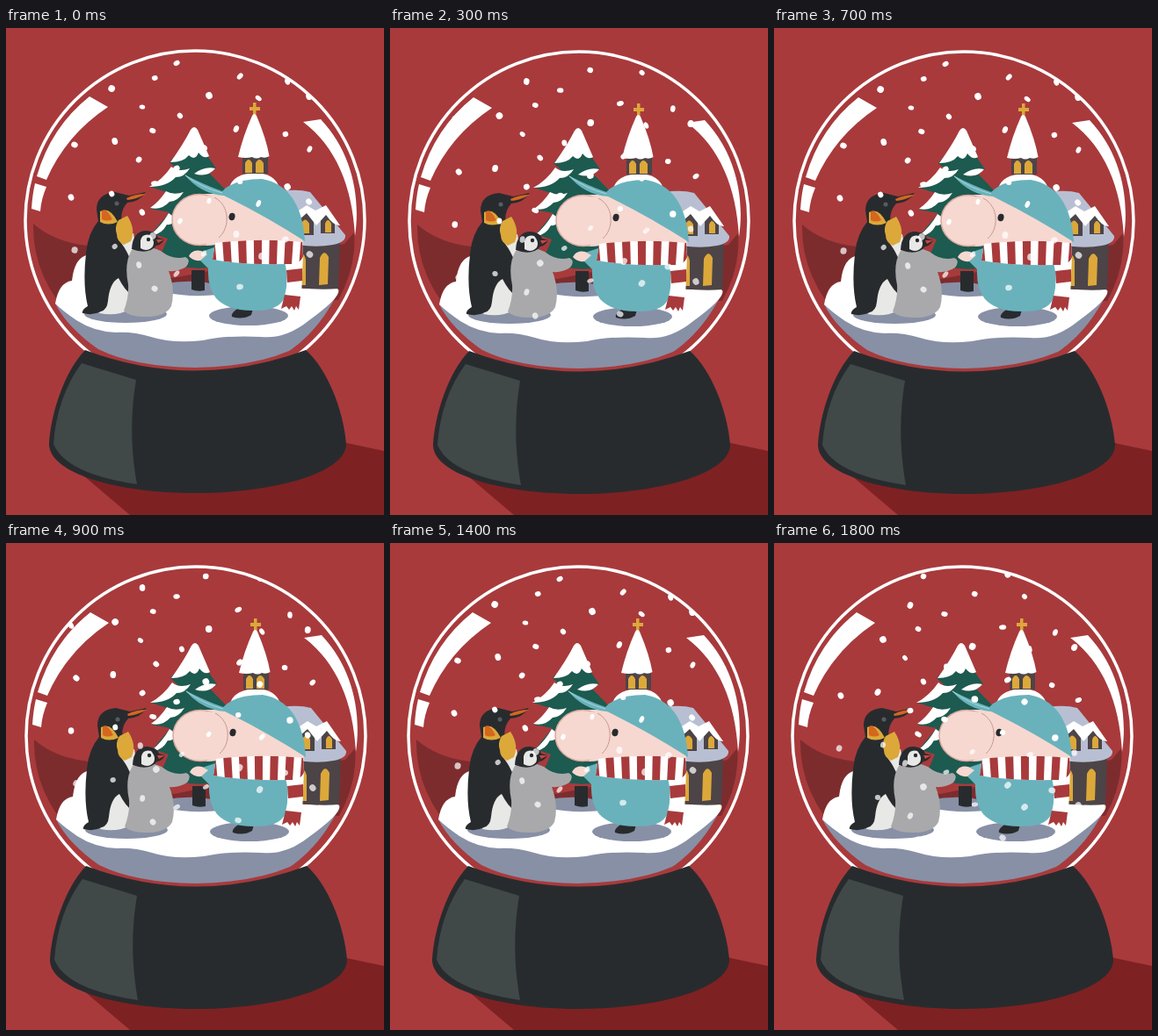
These frames come from a looping animation (430 px wide and 555 px high, 1900 ms). An HTML page:

```html
<!DOCTYPE html>
<html lang="en">
<head>
<meta charset="utf-8">
<title>Snow globe</title>
<style>
html, body { margin: 0; width: 430px; height: 555px; overflow: hidden; background: #a83a3c }
svg { display: block }
.w { fill: #fff } .k { fill: #282b2e } .r { fill: #a83a3c } .g { fill: #8890a6 }
.t { fill: #69b2bc } .y { fill: #dca83a } .b { fill: #4c4447 } .p { fill: #f6d8d0 }
</style>
</head>
<body>
<svg width="430" height="555" viewBox="0 0 430 555">
  <defs>
    <clipPath id="ball"><circle cx="215" cy="219" r="192"/></clipPath>
    <clipPath id="wrap"><path d="M238 245Q290 239 337 244L338 260Q335 270 318 269Q270 270 235 264Z"/></clipPath>
  </defs>
  <path fill="#7e2122" d="M360 467L430 482V555H141L88 510Z"/>
  <g id="globe">
    <g id="backdrop">
      <path fill="#7d2c2e" d="M31 223Q55 244 93 248L190 285L385 246L396 233Q399 272 378 310H58Q30 270 31 223Z"/>
      <path class="g" d="M56 314L378 300C362 334 340 356 322 368Q280 386 215 387Q145 386 105 366C82 350 65 332 56 314Z"/>
      <path class="w" d="M56 314Q60 290 75 288Q78 260 95 258L150 260L185 291L345 297Q372 292 378 298Q382 306 345 333Q318 355 290 352Q250 350 224 356Q190 360 165 352Q145 346 125 347Q100 346 80 333Q64 322 56 314Z"/>
      <path class="g" d="M178 292Q212 285 242 293V304Q210 307 184 302Z"/>
    </g>
    <g id="church">
      <path class="w" d="M254 182Q258 166 284 165Q306 166 311 182Z"/>
      <path class="b" d="M269 146H298V166H269Z"/>
      <path class="y" d="M272 165V154Q276 146 280 154V165ZM284 165V154Q288 146 293 154V165ZM281 85H284.500V90H289V94H284.500V102H281V94H277V90H281Z"/>
      <path class="w" d="M280 100Q282 96 285 100Q296 126 299.500 146Q295 149 290 147Q285 150 280 147Q273 149 264 147Q270 122 280 100Z"/>
    </g>
    <g id="house">
      <path class="b" d="M332 238H380L378 297Q358 299 332 296Z"/>
      <path fill="#b9bfd2" d="M312 186Q332 183 346 187L386 236Q387 244 372 247Q352 251 325 246Z"/>
      <path class="b" d="M333 214L341 207L350 218V236H333ZM358 219L364 209L374 220V234H358Z"/>
      <path class="y" d="M336 234V223Q340 214 345 223V234ZM363 233V223Q366 215 370 223V233ZM334 293V264Q338 252 341 264V293ZM356 293L357 262Q362 251 367 261L366 292Z"/>
      <path class="w" d="M330 210L342 202L352 208L364 202L380 225Q373 226 364 213L353 225L342 211L333 219Z"/>
    </g>
    <g id="tree">
      <path class="k" d="M211 276H226V299Q218 301 211 298Z"/>
      <path fill="#1d5a4f" d="M213 122L239 160L230 164L253 188L240 193L258 223L245 270Q210 280 174 263L184 240L166 234L186 210L164 206L186 188L164 181L194 160L186 153Z"/>
      <path class="w" d="M210 116Q214 110 218 116L231 146Q225 150 219 142Q215 152 208 145Q202 153 187 153Q202 132 210 116ZM188 158Q196 165 209 160Q203 170 193 170Q183 181 163 181Q178 173 188 158ZM238 160Q226 157 214 166Q229 171 238 160ZM182 186Q191 191 202 187Q195 198 186 198Q177 208 164 205Q174 198 182 186ZM185 211L195 218Q188 225 183 224Q176 237 165 235Q177 225 185 211Z"/>
    </g>
    <ellipse class="g" cx="136" cy="326" rx="47" ry="10"/>
    <ellipse class="g" cx="276" cy="328" rx="45" ry="11"/>
    <g id="penguin">
      <path fill="#e8e8e6" d="M128 235L145 234Q154 280 140 321Q126 329 106 325Z"/>
      <path class="k" d="M103 207Q103 189 124 187L140 191L159 187Q152 198 138 199Q129 209 132 223L131 245Q144 262 147 287Q148 300 143 304Q135 299 128 285Q118 290 116 311Q115 321 108 323Q99 328 87 325Q86 321 93 317Q87 292 91 257Q93 234 105 220Z"/>
      <path class="y" d="M128 219L138 214Q148 229 142 243L134 247Q126 243 126 235Q123 227 128 219ZM107 209Q118 203 127 221Q116 226 107 221Z"/>
      <path fill="#d5661f" d="M109 208Q115 205 121 218Q115 221 109 218ZM137 194Q147 189 159 189Q149 195 138 196Z"/>
      <circle cx="126" cy="200" r="2.500" fill="#555d60"/>
    </g>
    <g id="chick">
      <path fill="#a9a9ab" d="M143 253Q160 246 176 254Q190 265 204 261Q211 264 205 272Q196 278 185 277Q193 298 188 317Q181 330 157 329Q140 329 134 322Q140 307 139 292Q134 268 143 253Z"/>
      <path class="k" d="M143 252Q144 231 160 231Q171 232 173 239L180 241Q176 248 171 248Q162 259 143 252Z"/>
      <path fill="#e8e8e6" d="M153 242Q155 234 164 236Q170 243 167 249Q161 256 153 251Z"/>
      <path fill="#c74840" d="M171 241L180 241L173 245Z"/>
      <circle class="k" cx="162" cy="241" r="2.200"/>
    </g>
    <g id="visitor">
      <path class="k" d="M263 320Q255 326 257 329Q269 333 279 327L281 320Z"/>
      <path class="t" d="M222 255L243 248L318 266Q327 289 316 309Q309 322 284 322Q253 323 239 308Q229 295 230 274L219 263Z"/>
      <path class="p" d="M208 260Q212 252 222 254L229 258L221 265Q213 266 208 260Z"/>
      <path class="p" d="M222 189L246 189Q292 205 337 236L338 247H238Q228 249 219 247Z"/>
      <ellipse class="p" cx="220" cy="218.500" rx="31" ry="29" stroke="#d8a79f" stroke-width="1.500"/>
      <path class="p" d="M229 191L247 193Q257 219 247 243L228 247Z"/>
      <path d="M237 193C255 202 255 228 242 239" fill="none" stroke="#c99890"/>
      <path class="t" d="M203 167Q226 179 246 186Q259 172 291 172Q336 180 340 243Q295 214 248 191Q221 189 203 167Z"/>
      <path d="M204 168Q223 182 246 188" fill="none" stroke="#a9d5da"/>
      <ellipse class="k" cx="257" cy="215" rx="3.500" ry="4.300" transform="rotate(12 257 215)"/>
      <path class="w" d="M317 266L338 258L336 306H317Q322 286 317 266Z"/>
      <path class="r" d="M319 276L337 274V288L320 290ZM317 304L335 306L333 321L330 317L328 322L325 317L322 321L319 317L313 320Z"/>
      <g clip-path="url(#wrap)">
        <path class="w" d="M230 235H340V275H230Z"/>
        <path d="M234 256Q290 251 342 256" fill="none" stroke="#a83a3c" stroke-width="40" stroke-dasharray="9 8.500" stroke-dashoffset="4.500"/>
      </g>
    </g>
    <circle cx="215" cy="219" r="193" fill="none" stroke="#fff" stroke-width="3.500"/>
    <path class="w" d="M95 78L116 90Q68 122 46 173L35 169Q51 113 95 78ZM33 177L46 181Q40 195 39 209L29 206Q30 190 33 177ZM338 107L358 104C392 140 404 190 397 237C394 180 375 135 338 107Z"/>
    <g id="base">
      <path class="k" d="M90 367Q215 414 341 367C365 388 384 435 387 474C387 507 305 530 215 530C125 530 49 507 49 474C51 440 66 392 90 367Z"/>
      <path fill="#414848" d="M86 382L148 401Q138 460 149 520Q68 508 54 474Q58 420 86 382Z"/>
    </g>
    <g id="snow" class="w" clip-path="url(#ball)"></g>
  </g>
</svg>
<script>
const GAP = 60, ROWS = 6;
// Columns of falling snow: x and height of the first flake
const columns = [
  [76, 13], [122, 9], [153, 30], [168, 57], [196, 40],
  [228, 17], [264, 55], [289, 20], [319, 1], [345, 18]
];
const globe = document.getElementById('globe');
const snow = document.getElementById('snow');

let seed = 7;
function random() {
  seed = seed * 16807 % 2147483647;
  return seed / 2147483647;
}

const flakes = columns.flatMap(([x, top], i) =>
  Array.from({ length: ROWS }, (_, row) => {
    const dot = document.createElementNS('http://www.w3.org/2000/svg', 'ellipse');
    dot.setAttribute('rx', 2.4 + random() * 1.6);
    dot.setAttribute('ry', 3 + random() * 1.2);
    snow.append(dot);
    return { dot, x, y: top + (row - 1) * GAP, turn: random() * 180, phase: i * 2 };
  }));

function draw(time) {
  const step = Math.floor(time % 1900 / 100);
  const fall = step % 7 % 6 / 6 * GAP;
  const dx = step < 4 ? 0 : step < 11 ? 1 : -1;
  const dy = step % 12 ? 1 : 0;
  globe.setAttribute('transform', `translate(${dx} ${dy})`);
  for (const flake of flakes) {
    const y = flake.y + fall;
    const x = flake.x + 3 * Math.sin(y / 19 + flake.phase);
    flake.dot.setAttribute('transform', `translate(${x} ${y}) rotate(${flake.turn + fall})`);
    flake.dot.setAttribute('opacity', y > 225 ? 0.72 : 1);
  }
}

const start = performance.now();
function tick() {
  draw(performance.now() - start);
  requestAnimationFrame(tick);
}
tick();
</script>
</body>
</html>
```
